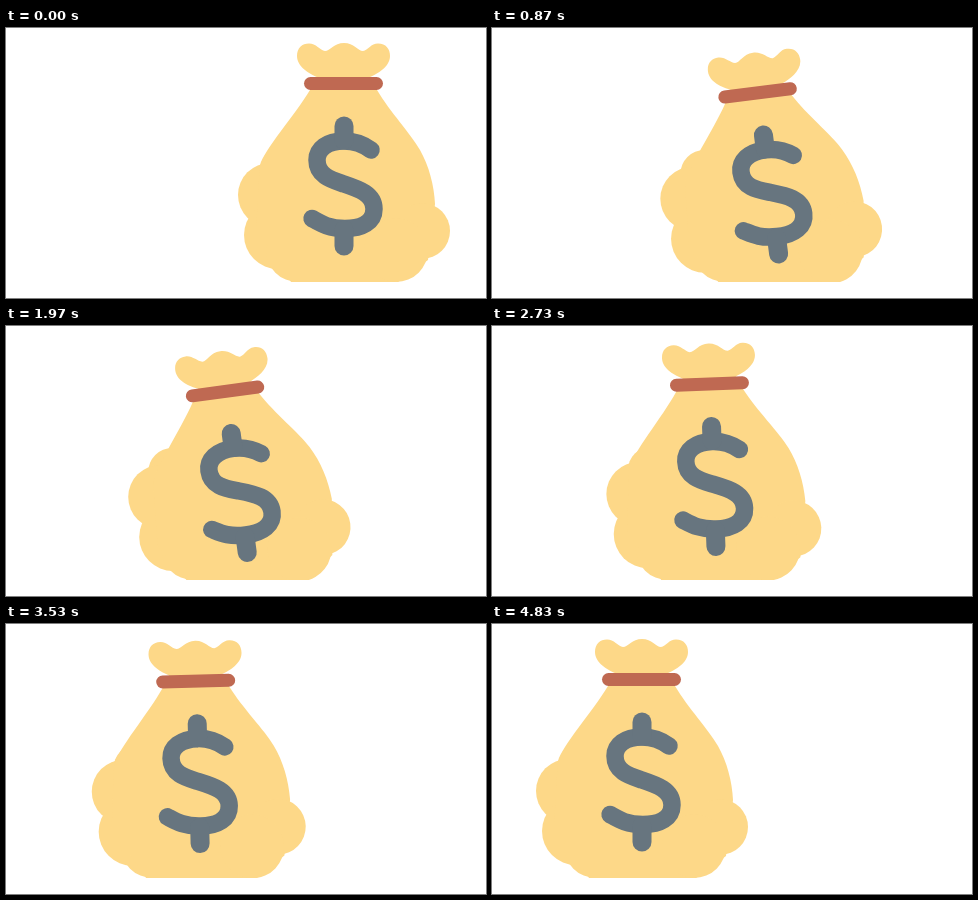
Recreate the animation shown at these times as an HTML page with a canvas. Size 480 by 270 pixels, loop 5010 ms.

```html
<!DOCTYPE html>
<html lang="en">
<head>
<meta charset="utf-8">
<title>Waddling money bag</title>
<style>
  html, body { margin: 0; width: 100%; height: 100%; overflow: hidden; background: #fff; }
  canvas { display: block; width: 480px; height: 270px; }
</style>
</head>
<body>
<canvas id="stage" width="480" height="270"></canvas>
<script>
const ctx = document.getElementById('stage').getContext('2d');
const LOOP = 5010, START = 195, END = 4830;
const STEP = 100 / 3;         // one drawn picture
const CYCLE = 1167;           // one rock to the left and back
const GROUND = 254;
const CENTER = { x: 338, y: 158 };
const CLOTH = '#fdd888', BAND = '#bf6952', INK = '#67757f';

const cloth = new Path2D(`
  M311 49 C304 46 291 39 291 28 C291 20 296 15.5 303 15.5
  C310 15.5 314 22 319 23 C324 23 328 15 338 15
  C348 15 352 23 357 23 C362 22 365 15.5 372 15.5
  C380 15.5 384 21 384 28 C384 39 371 46 364 49 L371 62
  C384 84 405 106 414 122 C423 138 428 157 429 176
  L422 232 L392 254 L285 254 L250 200 L254 137
  C258 122 289 87 304 62 Z`);
const sign = new Path2D(`
  M365 122 C357 116 348 113 338 113 C321 113 311 121 311 132
  C311 148 326 152 338 156 C353 161 368 166 368 181
  C368 194 356 200.5 339 200.5 C322 200.5 314 195 306 190.5`);

function disc(x, y, r) {
  ctx.beginPath();
  ctx.arc(x, y, r, 0, Math.PI * 2);
  ctx.fill();
}

function bar(x1, y1, x2, y2, width) {
  ctx.lineWidth = width;
  ctx.beginPath();
  ctx.moveTo(x1, y1);
  ctx.lineTo(x2, y2);
  ctx.stroke();
}

function pose(t) {
  const travel = Math.min(1, Math.max(0, (t - START) / (END - START)));
  const moving = t > START && t < END;
  const swing = moving ? Math.abs(Math.sin(Math.PI * (t - START) / CYCLE)) : 0;
  const turn = swing ** 2;
  return {
    turn,
    x: CENTER.x - 188 * travel - 33 * swing ** 1.4,
    y: CENTER.y + 9 * turn
  };
}

// The left folds slide with the bag but do not turn with it.
function drawFolds(turn) {
  ctx.fillStyle = CLOTH;
  disc(-60 - 7 * turn, -14 - 7 * turn, 24);
  disc(-74 - 5 * turn, 9 - 5 * turn, 32);
  disc(-66, 49 - 5 * turn, 34);
  disc(-46, 64 - 9 * turn, 32);
}

function drawBag() {
  ctx.fillStyle = CLOTH;
  ctx.fill(cloth);
  disc(416, 203, 28);
  disc(390, 222, 32);

  ctx.lineCap = 'round';
  ctx.strokeStyle = BAND;
  bar(304.5, 55.5, 370.5, 55.5, 13);

  ctx.strokeStyle = INK;
  ctx.lineWidth = 17.5;
  ctx.stroke(sign);
  bar(338, 98, 338, 112, 19);
  bar(338, 202, 338, 218, 19);
}

function draw(t) {
  const { turn, x, y } = pose(t);
  ctx.fillStyle = '#fff';
  ctx.fillRect(0, 0, 480, 270);
  ctx.save();
  ctx.beginPath();
  ctx.rect(0, 0, 480, GROUND);
  ctx.clip();
  ctx.translate(x, y);
  drawFolds(turn);
  ctx.rotate(-7.7 * turn * Math.PI / 180);
  ctx.translate(-CENTER.x, -CENTER.y);
  drawBag();
  ctx.restore();
}

let origin;
function tick(now) {
  origin ??= now;
  const t = (now - origin) % LOOP;
  const picture = Math.floor((t + 4) / STEP);
  draw(t < START ? 0 : picture * STEP);
  requestAnimationFrame(tick);
}
draw(0);
requestAnimationFrame(tick);
</script>
</body>
</html>
```
